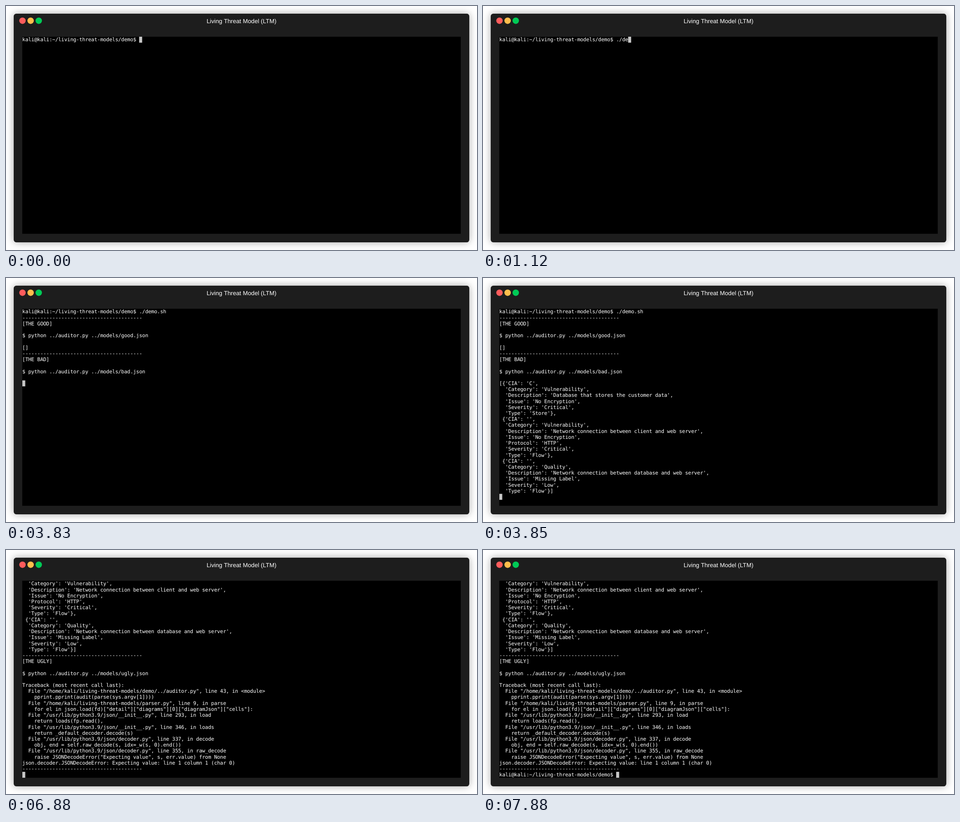
Animation of 1037x540 px, one loop 8210 ms. Source, as an HTML page:

```html
<!DOCTYPE html>
<html lang="en">
<head>
<meta charset="utf-8">
<title>Living Threat Model (LTM)</title>
<style>
  html, body { margin: 0; width: 100%; height: 100%; overflow: hidden; background: #fff; }
  /* Laid out at 1100 x 572, shown at 1037 x 540 */
  #stage {
    position: absolute; left: 0; top: 0; width: 1100px; height: 572px;
    transform: scale(calc(1037 / 1100), calc(540 / 572)); transform-origin: 0 0;
    text-rendering: geometricPrecision;
  }
  #window {
    position: absolute; left: 18px; top: 18px; width: 1064px; height: 536px;
    border-radius: 6px; background: #1d1d1d; box-shadow: 0 0 18px rgba(0, 0, 0, .35);
  }
  #title {
    position: absolute; left: 0; right: 0; top: 9px; text-align: center;
    font: 14px/16px "Liberation Sans", Arial, sans-serif; color: #fff;
  }
  .dot { position: absolute; top: 9px; width: 15px; height: 15px; border-radius: 50%; }
  .red { left: 13px; background: #ff5c5c; }
  .yellow { left: 32px; background: #ffbd4c; }
  .green { left: 51px; background: #00ca56; }
  #term {
    position: absolute; left: 20px; top: 54px; width: 1024px; height: 462px;
    overflow: hidden; background: #000;
  }
  #text {
    margin: 0; color: #fff; font: 12px/14px "DejaVu Sans Mono", monospace;
    letter-spacing: calc(7px - 1ch); font-variant-ligatures: none;
  }
  #cursor { position: absolute; left: 0; top: 0; width: 7px; height: 14px; background: #c7c7c7; }
</style>
</head>
<body>
<div id="stage">
  <div id="window">
    <i class="dot red"></i><i class="dot yellow"></i><i class="dot green"></i>
    <div id="title">Living Threat Model (LTM)</div>
    <div id="term"><pre id="text"></pre><div id="cursor"></div></div>
  </div>
</div>
<script>
const LOOP = 8210, ROWS = 33, CELL_W = 7, CELL_H = 14;

const prompt = 'kali@kali:~/living-threat-models/demo$ ';
const rule = '-'.repeat(40) + '\n';
const header = name =>
  `${rule}[THE ${name.toUpperCase()}]\n\n$ python ../auditor.py ../models/${name}.json\n\n`;

const findings = `[{'CIA': 'C',
  'Category': 'Vulnerability',
  'Description': 'Database that stores the customer data',
  'Issue': 'No Encryption',
  'Severity': 'Critical',
  'Type': 'Store'},
 {'CIA': '',
  'Category': 'Vulnerability',
  'Description': 'Network connection between client and web server',
  'Issue': 'No Encryption',
  'Protocol': 'HTTP',
  'Severity': 'Critical',
  'Type': 'Flow'},
 {'CIA': '',
  'Category': 'Quality',
  'Description': 'Network connection between database and web server',
  'Issue': 'Missing Label',
  'Severity': 'Low',
  'Type': 'Flow'}]
`;

const traceback = `Traceback (most recent call last):
  File "/home/kali/living-threat-models/demo/../auditor.py", line 43, in <module>
    pprint.pprint(audit(parse(sys.argv[1])))
  File "/home/kali/living-threat-models/parser.py", line 9, in parse
    for el in json.load(fd)["detail"]["diagrams"][0]["diagramJson"]["cells"]:
  File "/usr/lib/python3.9/json/__init__.py", line 293, in load
    return loads(fp.read(),
  File "/usr/lib/python3.9/json/__init__.py", line 346, in loads
    return _default_decoder.decode(s)
  File "/usr/lib/python3.9/json/decoder.py", line 337, in decode
    obj, end = self.raw_decode(s, idx=_w(s, 0).end())
  File "/usr/lib/python3.9/json/decoder.py", line 355, in raw_decode
    raise JSONDecodeError("Expecting value", s, err.value) from None
json.decoder.JSONDecodeError: Expecting value: line 1 column 1 (char 0)
`;

// Terminal output: [time in ms, text appended]
const output = [
  [0, prompt],
  [580, '.'], [810, '/'], [960, 'd'], [1120, 'e'], [1180, 'm'],
  [1360, 'o.sh '],
  [1800, '\n' + header('good')],
  [1820, '[]\n'],
  [3830, header('bad')],
  [3850, findings],
  [6850, header('ugly')],
  [6880, traceback + rule],
  [7880, prompt],
];

const text = document.getElementById('text');
const cursor = document.getElementById('cursor');
let shown = -1;

function draw(now) {
  const t = now % LOOP;
  const count = output.filter(([at]) => at <= t).length;
  if (count !== shown) {
    shown = count;
    const all = output.slice(0, count).map(([, part]) => part).join('');
    const lines = all.split('\n').slice(-ROWS);
    const row = lines.length - 1;
    text.textContent = lines.join('\n');
    cursor.style.left = lines[row].length * CELL_W + 'px';
    cursor.style.top = row * CELL_H + 'px';
  }
}

const start = performance.now();
function tick() {
  draw(performance.now() - start);
  requestAnimationFrame(tick);
}
tick();
</script>
</body>
</html>
```
